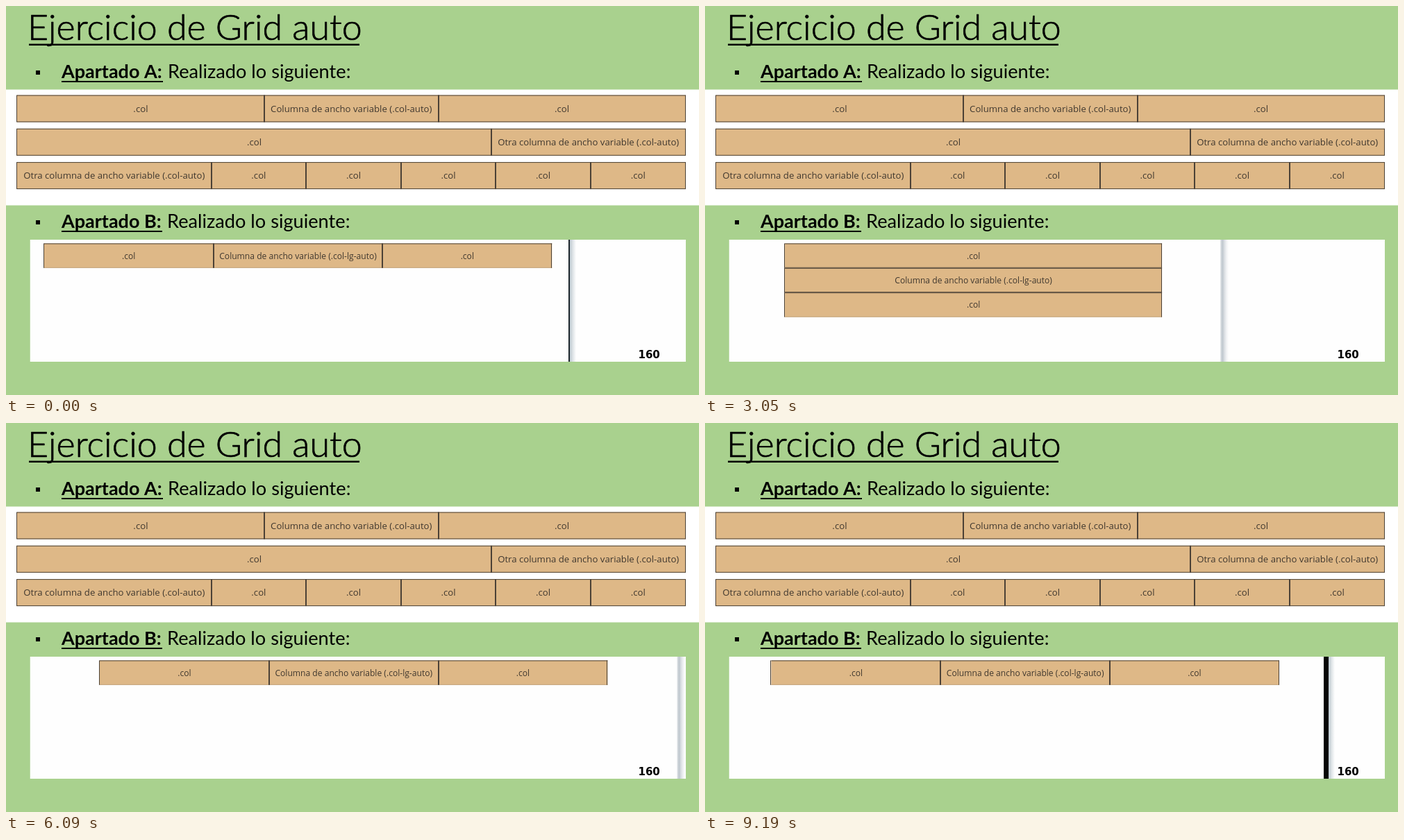
An HTML page with a canvas that plays this animation: 998 px wide and 561 px high, repeating every 9.26 s.

```html
<!DOCTYPE html>
<html lang="es">
<head>
<meta charset="utf-8">
<title>Ejercicio de Grid auto</title>
<style>
html, body { margin: 0; width: 100%; height: 100%; overflow: hidden; background: #a9d18e; }
canvas { display: block; width: 100vw; height: 100vh; }
</style>
</head>
<body>
<canvas id="stage" width="998" height="561"></canvas>
<script>
const ctx = document.getElementById('stage').getContext('2d');
const LOOP = 9260, STEPS = 140;
const GREEN = '#a9d18e', TAN = '#deb887', LINE = '#4b4136', FAINT = '#c2a57f', INK = '#40382f';
const LATO = 'Lato, Carlito, sans-serif', CELL = '"Open Sans", "Noto Sans", sans-serif';
const PANEL = { x: 34.5, y: 337, w: 944.5, h: 176 };
const WINDOW_LEFT = 30, NARROW = 743.2, WIDE = 978, ROW = 35.4;

// Start and end step of each drag; they widen and narrow the window in turn.
const DRAGS = [[-11.3, 20.5], [22.3, 46], [54.7, 86.5], [90, 110], [119.2, 152.7]];

const smooth = u => u * u * (3 - 2 * u);

function dragAt(step) {
  const i = DRAGS.findLastIndex(([start]) => start <= step);
  const [start, end] = DRAGS[i];
  const u = Math.min(1, (step - start) / (end - start));
  const growing = i % 2 === 0;
  const k = growing ? smooth(u) : 1 - smooth(u);
  // The dark trail is thickest just past the middle of a widening drag.
  const trail = growing ? Math.round(2 + 5 * Math.exp(-(((u - 0.6) / 0.12) ** 2))) : 0;
  return { right: NARROW + (WIDE - NARROW) * k, trail };
}

function rect(x, y, w, h, color) {
  ctx.fillStyle = color;
  ctx.fillRect(x, y, w, h);
}

function text(str, x, y, font, color = '#000', align = 'left') {
  ctx.font = font;
  ctx.fillStyle = color;
  ctx.textAlign = align;
  ctx.fillText(str, x, y);
}

function title() {
  const str = 'Ejercicio de Grid auto';
  text(str, 31, 49, `300 52px ${LATO}`);
  ctx.strokeStyle = '#000';
  ctx.lineWidth = 0.7;
  ctx.lineJoin = 'round';
  ctx.strokeText(str, 31, 49);
  rect(33, 54.5, 476, 2.5, '#000');
}

function heading(letter, y, width) {
  rect(43, y - 11, 6, 6, '#000');
  text(`Apartado ${letter}:`, 80, y, `bold 27px ${LATO}`);
  rect(80, y + 4, width, 2, '#000');
  text('Realizado lo siguiente:', 87 + width, y, `27.2px ${LATO}`);
}

// Auto cells fit their label; the others share the remaining width.
function cellWidths(labels, width, size) {
  if (labels.length === 1) return [width];
  ctx.font = `${size}px ${CELL}`;
  const fit = labels.map(s => s.includes('auto') ? ctx.measureText(s).width + size * 1.4 : 0);
  const rest = width - fit.reduce((a, b) => a + b);
  const share = rest / fit.filter(w => !w).length;
  return fit.map(w => w || share);
}

function gridRow(x, y, width, h, labels, size, bottom = LINE) {
  const edge = (at, w) => rect(Math.floor(at - 0.5), y, w, h, LINE);
  rect(x, y, width, h, TAN);
  rect(x, y, width, 1, LINE);
  rect(x, y + h - 1, width, 1, bottom);
  edge(x, 1);
  edge(x + width, 1);
  let left = x;
  cellWidths(labels, width, size).forEach((w, i) => {
    if (i) edge(left, 2);
    text(labels[i], left + w / 2, y + h / 2 + size * 0.37, `${size}px ${CELL}`, INK, 'center');
    left += w;
  });
}

function drawSlide() {
  rect(0, 0, 998, 561, GREEN);
  title();
  heading('A', 104, 146);
  heading('B', 320, 145);

  rect(0, 120.5, 998, 167, '#fff');
  const col = '.col', auto = 'olumna de ancho variable (.col-auto)';
  const rows = [
    [col, 'C' + auto, col],
    [col, 'Otra c' + auto],
    ['Otra c' + auto, col, col, col, col, col]
  ];
  rows.forEach((labels, i) => gridRow(16, 128.5 + i * 48.3, 962.5, 39, labels, 13.2));
}

function drawContent(right) {
  const labels = ['.col', 'Columna de ancho variable (.col-lg-auto)', '.col'];
  const width = right >= 973 ? 872 : right >= 810 ? 731.5 : 543;
  const x = (WINDOW_LEFT + right - width) / 2;
  const rows = right < 810 ? labels.map(s => [s]) : [labels];
  rows.forEach((cells, i) =>
    gridRow(x, 342.4 + i * ROW, width, ROW, cells, 12.1, i < rows.length - 1 ? LINE : FAINT));
}

function shade(x, w, colors) {
  const g = ctx.createLinearGradient(x, 0, x + w, 0);
  colors.forEach((color, i) => g.addColorStop(i / (colors.length - 1), color));
  rect(x, PANEL.y, w, PANEL.h, g);
}

function drawEdge({ right, trail }) {
  if (trail) {
    const x = Math.round(right) - 1;
    shade(x + trail, 9, ['#bcc8cf', '#e0e5e8', '#fefefe']);
    rect(x, PANEL.y, trail, PANEL.h, trail > 2 ? '#050505' : '#1c252b');
  } else {
    const lag = Math.min(4, right - NARROW);
    shade(right - lag - 1, 12, ['#dfe3e6', '#bfc7ce', '#dce0e4', '#f2f3f5', '#fefefe']);
  }
}

function draw(time) {
  const step = Math.min(STEPS - 1, Math.floor((time % LOOP + 5) * STEPS / LOOP));
  const drag = dragAt(step);
  drawSlide();
  ctx.save();
  ctx.beginPath();
  ctx.rect(PANEL.x, PANEL.y, PANEL.w, PANEL.h);
  ctx.clip();
  rect(PANEL.x, PANEL.y, PANEL.w, PANEL.h, '#fefefe');
  drawContent(drag.right);
  drawEdge(drag);
  ctx.restore();
  text('160', 910.5, 508, 'bold 15px "DejaVu Sans", sans-serif');
}

const start = performance.now();
function tick() {
  draw(performance.now() - start);
  requestAnimationFrame(tick);
}
tick();
</script>
</body>
</html>
```
